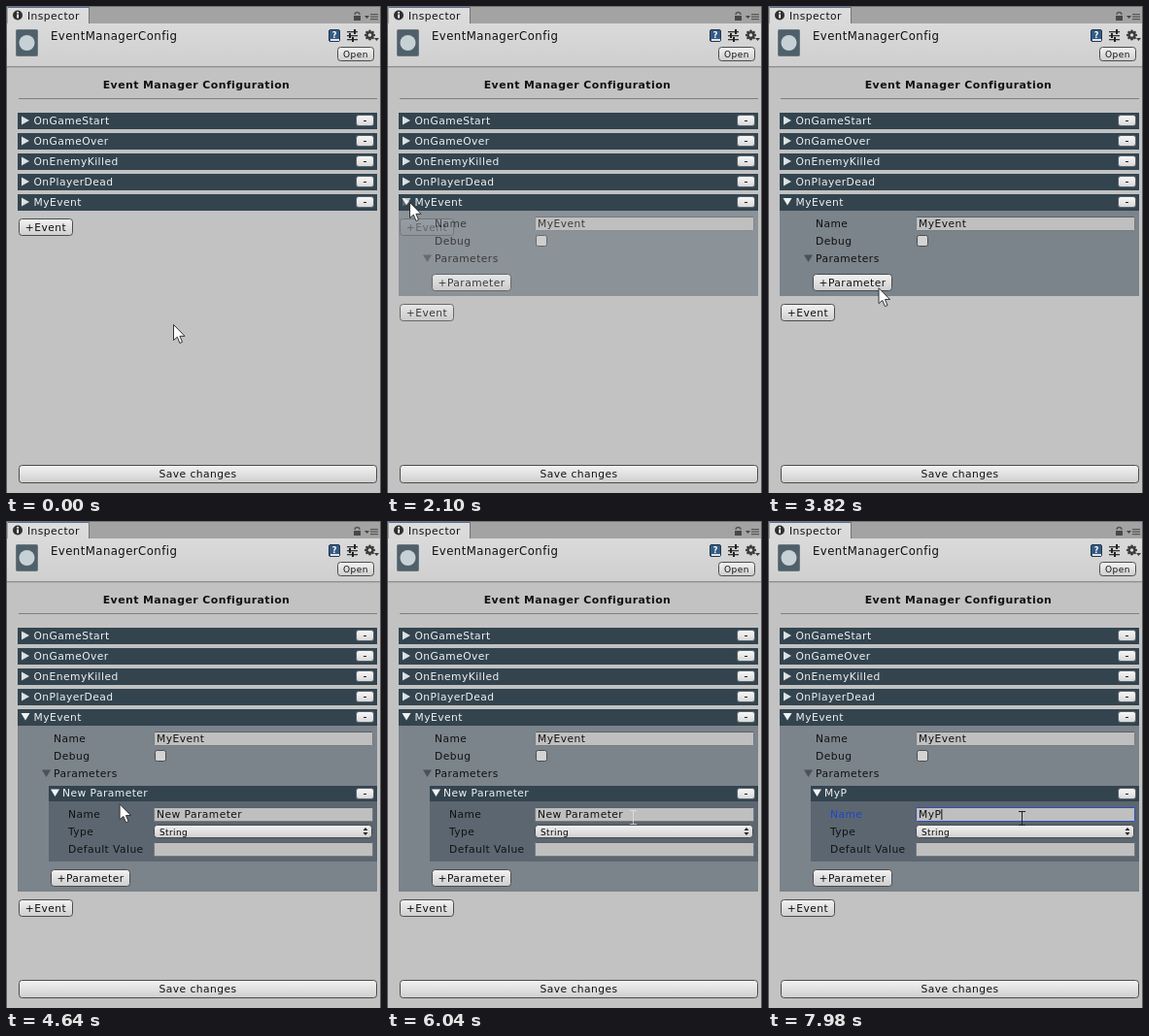
An HTML page with a canvas for the animation above (8 s loop, 386 px wide and 502 px high).

```html
<!DOCTYPE html>
<html lang="en">
<head>
<meta charset="utf-8">
<title>Event inspector</title>
<style>
html, body { margin: 0; width: 100%; height: 100%; overflow: hidden; background: #c2c2c2; }
canvas { display: block; width: 386px; height: 502px; }
</style>
</head>
<body>
<canvas id="stage"></canvas>
<script>
const W = 386, H = 502, LOOP = 8000, FADE = 80;
const DARK = '#33444f', INK = '#111', PALE = '#f0f2f3';
const SANS = '"DejaVu Sans", sans-serif';
const SIZE = 10.7, SPACING = '0.45px';
const EVENTS = ['OnGameStart', 'OnGameOver', 'OnEnemyKilled', 'OnPlayerDead', 'MyEvent'];

// Interface states; each one fades in over the one before it.
const STATES = [
  { at: -1000 },
  { at: 2040, open: true },
  { at: 4180, open: true, param: 'New Parameter' },
  { at: 6450, open: true, param: 'New Parameter', focus: true, selected: true },
  { at: 7300, open: true, param: 'M', focus: true },
  { at: 7560, open: true, param: 'My', focus: true },
  { at: 7800, open: true, param: 'MyP', focus: true }
];

// Pointer moves: time span, end points, vertical bend.
const MOVES = [
  { from: 50, to: 1650, a: [172, 328], b: [23, 202], bend: 16 },
  { from: 2270, to: 3890, a: [23, 202], b: [114, 291], bend: -18 },
  { from: 4500, to: 6300, a: [114, 291], b: [261, 306], bend: 0 }
];

const dpr = window.devicePixelRatio || 1;

function prepare(canvas) {
  canvas.width = W * dpr;
  canvas.height = H * dpr;
  const ctx = canvas.getContext('2d');
  ctx.scale(dpr, dpr);
  return ctx;
}

const screen = prepare(document.getElementById('stage'));
let g;

function rect(x, y, w, h, fill) {
  g.fillStyle = fill;
  g.fillRect(x, y, w, h);
}

function setFont(size = SIZE, weight = '') {
  g.font = `${weight} ${size}px ${SANS}`;
  g.letterSpacing = SPACING;
}

function text(s, x, y, color = INK, size = SIZE, weight = '', align = 'left') {
  setFont(size, weight);
  g.textAlign = align;
  g.fillStyle = color;
  g.fillText(s, x, y);
}

function poly(points, fill, stroke) {
  g.beginPath();
  points.forEach(([x, y]) => g.lineTo(x, y));
  g.closePath();
  if (fill) { g.fillStyle = fill; g.fill(); }
  if (stroke) { g.strokeStyle = stroke; g.lineWidth = 1; g.stroke(); }
}

function disc(x, y, r, fill) {
  g.beginPath();
  g.arc(x, y, r, 0, Math.PI * 2);
  g.fillStyle = fill;
  g.fill();
}

function shade(y, h, top, bottom) {
  const grad = g.createLinearGradient(0, y, 0, y + h);
  grad.addColorStop(0, top);
  grad.addColorStop(1, bottom);
  return grad;
}

function box(x, y, w, h, r, fill, stroke) {
  g.beginPath();
  g.roundRect(x + 0.5, y + 0.5, w - 1, h - 1, r);
  g.fillStyle = fill;
  g.fill();
  g.strokeStyle = stroke;
  g.lineWidth = 1;
  g.stroke();
}

function button(label, x, y, w, h, size = SIZE, base = 13) {
  box(x, y, w, h, 3, shade(y, h, '#f4f4f4', '#cdcdcd'), '#4c4c4c');
  text(label, x + w / 2, y + base, INK, size, '', 'center');
}

function minus(y) {
  box(360, y, 19, 12, 2.5, shade(y, 12, '#fafafa', '#d6d6d6'), '#59636a');
  rect(368, y + 6, 3, 1, '#222');
}

function field(value, y, h, border = '#777c80') {
  box(152, y, 226, h, 1, '#bfbfbf', border);
  rect(153, y, 224, 1, border === '#777c80' ? '#5c6165' : border);
  text(value, 155, y + 11);
}

function arrowRight(x, y, fill) {
  poly([[x, y - 4.5], [x + 8, y], [x, y + 4.5]], fill);
}

function arrowDown(x, y, fill) {
  poly([[x, y - 4], [x + 9, y - 4], [x + 4.5, y + 3.5]], fill);
}

function header() {
  rect(0, 0, W, 18, '#a3a3a3');
  rect(0, 0, W, 1, '#777');
  rect(2, 1, 83, 17, shade(1, 17, '#dedede', '#d9d9d9'));
  rect(85, 1, 1, 17, '#747474');
  rect(2, 1, 83, 1, '#56709c');
  disc(12, 9.5, 5, '#303030');
  rect(11.2, 6, 1.8, 1.6, '#fff');
  rect(11.2, 8.5, 1.8, 4, '#fff');
  text('Inspector', 22, 14);

  // lock and menu
  g.strokeStyle = '#555';
  g.lineWidth = 1.3;
  g.beginPath();
  g.arc(361.5, 9, 2.5, Math.PI, 0);
  g.stroke();
  rect(358, 10, 7, 5, '#484848');
  poly([[369, 10], [374, 10], [371.5, 13]], '#444');
  for (let i = 0; i < 3; i++) rect(375, 8 + i * 2.5, 8, 1.2, '#555');

  rect(0, 18, W, 44, shade(18, 44, '#dadada', '#cfcfcf'));
  rect(0, 62, W, 1, '#8c8c8c');
  rect(0, 63, W, 1, '#b3b3b3');
  box(10, 24, 23, 28, 1, '#4f606a', '#6b7880');
  disc(21.5, 38, 8, '#c6d1d6');
  text('EventManagerConfig', 46, 35, INK, 11.7);

  // help, presets, settings
  box(332, 24, 12, 13, 1.5, '#335b86', '#24364b');
  rect(334, 34, 9, 2, '#dfe7ee');
  text('?', 338.3, 33, '#fff', 8, 'bold', 'center');
  [[26, 358], [30, 353], [34, 356]].forEach(([y, x]) => {
    rect(351, y, 11, 1.3, '#333');
    rect(x, y - 2, 2, 5, '#222');
  });
  for (let i = 0; i < 8; i++) {
    const a = i * Math.PI / 4;
    disc(374.5 + 4.3 * Math.cos(a), 30 + 4.3 * Math.sin(a), 1.3, '#3b3b3b');
  }
  disc(374.5, 30, 4, '#3b3b3b');
  disc(374.5, 30, 1.8, '#dadada');
  poly([[379, 33], [384, 33], [381.5, 36]], '#3b3b3b');
  button('Open', 341, 42, 38, 15, 9, 11);
}

function paramBlock(state) {
  rect(44, 289, 338, 62, '#5b6670');
  rect(44, 273, 338, 16, DARK);
  arrowDown(46, 280.5, PALE);
  text(state.param, 58, 284, PALE);
  minus(275);
  text('Name', 64, 306, state.focus ? '#2145c8' : INK);
  field('', 295, 15, state.focus ? '#344fb4' : undefined);
  setFont();
  const end = 155 + g.measureText(state.param).width;
  if (state.selected) rect(154, 296, end - 154, 13, '#6c8cd2');
  text(state.param, 155, 306);
  if (state.focus && !state.selected) rect(end, 297, 1, 11, '#111');
  text('Type', 64, 324);
  box(152, 313, 225, 14, 3, shade(313, 14, '#f3f3f3', '#cfcfcf'), '#4c4c4c');
  text('String', 158, 323.5, '#000', 8.9);
  poly([[367.5, 319], [372.5, 319], [370, 316]], '#222');
  poly([[367.5, 321], [372.5, 321], [370, 324]], '#222');
  text('Default Value', 64, 342);
  field('', 331, 15);
}

function eventPanel(state) {
  const shift = state.param ? 83 : 0;
  rect(12, 211, 370, 88 + shift, '#7b838b');
  text('Name', 49, 228);
  field('MyEvent', 217, 15);
  text('Debug', 49, 246);
  box(153, 236, 12, 12, 2, '#d3d3d3', '#4c4c4c');
  arrowDown(37, 260.5, '#4b5156');
  text('Parameters', 49, 264);
  if (state.param) paramBlock(state);
  button('+Parameter', 46, 276 + shift, 82, 18);
}

function paint(state) {
  rect(0, 0, W, H, '#c2c2c2');
  header();
  text('Event Manager Configuration', 196, 85, INK, 10.9, 'bold', 'center');
  rect(13, 95, 369, 1, '#7f7f7f');
  EVENTS.forEach((name, i) => {
    const y = 110 + i * 21;
    rect(12, y, 370, 17, DARK);
    if (i === 4 && state.open) arrowDown(15.5, y + 8, PALE);
    else arrowRight(16, y + 8, '#dce1e3');
    text(name, 28.5, y + 12, PALE);
    minus(y + 2);
  });
  if (state.open) eventPanel(state);
  button('+Event', 13, state.param ? 390 : state.open ? 307 : 219, 56, 18);
  button('Save changes', 13, 473, 369, 19);
  rect(0, 0, 1, H, '#5e5e5e');
  rect(385, 0, 1, H, '#5e5e5e');
}

const layers = STATES.map(state => {
  const canvas = document.createElement('canvas');
  g = prepare(canvas);
  paint(state);
  return canvas;
});

function pointer(t) {
  let p = MOVES[0].a;
  for (const m of MOVES) {
    if (t < m.from) break;
    const u = Math.min(1, (t - m.from) / (m.to - m.from));
    const s = u * u * (3 - 2 * u);
    p = [
      m.a[0] + (m.b[0] - m.a[0]) * s,
      m.a[1] + (m.b[1] - m.a[1]) * s + m.bend * 4 * s * (1 - s)
    ];
  }
  return p;
}

function arrow([x, y], alpha) {
  const shape = [[0, 0], [0, 16], [3.8, 12.7], [6.4, 19], [9, 17.9], [6.4, 11.8], [11.5, 11.8]];
  g.globalAlpha = alpha;
  poly(shape.map(([dx, dy]) => [x + dx + 0.5, y + dy + 0.5]), '#fff', '#333');
  g.globalAlpha = 1;
}

function ibeam([x, y], color, alpha) {
  x = Math.round(x);
  y = Math.round(y);
  g.globalAlpha = alpha;
  rect(x, y - 7, 1, 15, color);
  for (const edge of [y - 7, y + 7]) {
    rect(x - 3, edge, 3, 1, color);
    rect(x + 1, edge, 3, 1, color);
  }
  g.globalAlpha = 1;
}

function drawPointer(t) {
  const now = pointer(t), next = pointer(t + 40);
  const step = Math.hypot(next[0] - now[0], next[1] - now[1]);
  if (t > 4180 && now[0] > 152) {
    if (step > 1) ibeam(now, '#e4e4e4', 0.75);
    else ibeam(now, '#222', 1);
    return;
  }
  if (step > 2) arrow(next, 0.45);
  arrow(now, step > 2 ? 0.9 : 1);
}

function frame() {
  const t = performance.now() % LOOP;
  g = screen;
  let i = STATES.length - 1;
  while (STATES[i].at > t) i--;
  const mix = Math.min(1, (t - STATES[i].at) / FADE);
  if (mix < 1) g.drawImage(layers[i - 1], 0, 0, W, H);
  g.globalAlpha = mix;
  g.drawImage(layers[i], 0, 0, W, H);
  g.globalAlpha = 1;
  drawPointer(t);
  requestAnimationFrame(frame);
}

frame();
</script>
</body>
</html>
```
